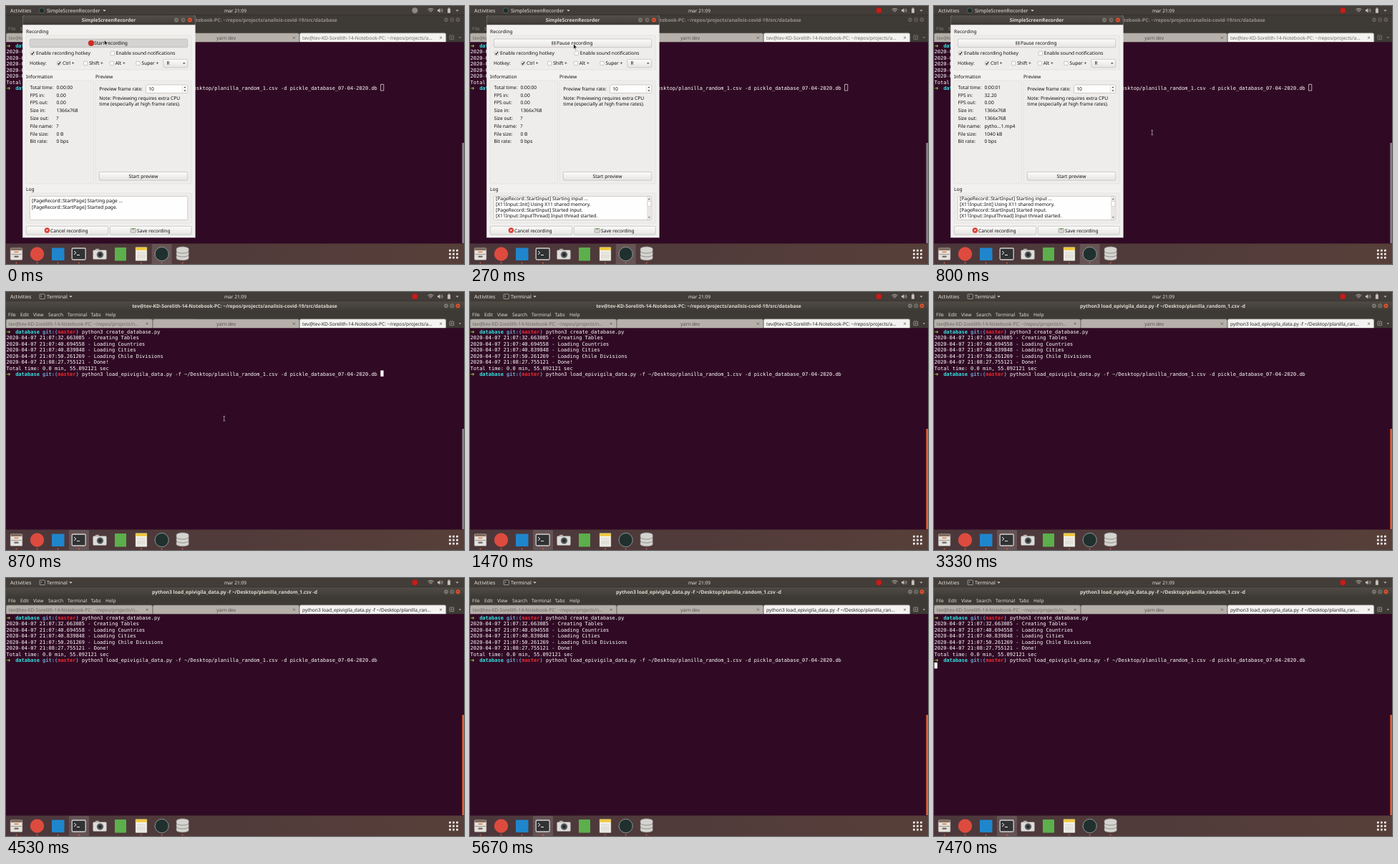
Recreate the animation shown at these times as an HTML page with a canvas. Size 640 by 360 pixels, loop 8000 ms.

```html
<!DOCTYPE html>
<html lang="en">
<head>
<meta charset="utf-8">
<title>Screen recording of a terminal</title>
<style>
html, body { margin: 0; width: 100%; height: 100%; overflow: hidden; background: #300a24; }
canvas { display: block; width: 640px; height: 360px; }
</style>
</head>
<body>
<canvas id="stage"></canvas>
<script>
const LOOP = 8000, STEP = 1000 / 15;
const K = 640 / 1366; // desktop pixels to stage pixels
const UI = '"Noto Sans", "Open Sans", sans-serif';
const MONO = '14.95px "DejaVu Sans Mono", monospace';
const CELL = 9 * K, ROW = 18 * K;
const HOST = 'tev@tev-KD-Sorelith-14-Notebook-PC: ~/repos/projects/';
const COMMAND = 'python3 load_epivigila_data.py -f ~/Desktop/planilla_random_1.csv -d';

const canvas = document.getElementById('stage');
const c = canvas.getContext('2d');
const dpr = window.devicePixelRatio || 1;
canvas.width = 640 * dpr;
canvas.height = 360 * dpr;

function rect(x, y, w, h, fill) {
  c.fillStyle = fill;
  c.fillRect(x, y, w, h);
}

function box(x, y, w, h, r, fill, stroke, line = 0.6) {
  c.beginPath();
  c.roundRect(x, y, w, h, r);
  if (fill) { c.fillStyle = fill; c.fill(); }
  if (stroke) { c.strokeStyle = stroke; c.lineWidth = line; c.stroke(); }
}

function disc(x, y, r, fill, stroke, line = 0.5) {
  c.beginPath();
  c.arc(x, y, r, 0, 7);
  c.fillStyle = fill;
  c.fill();
  if (stroke) { c.strokeStyle = stroke; c.lineWidth = line; c.stroke(); }
}

function path(points, stroke, line = 0.7, fill) {
  c.beginPath();
  for (let i = 0; i < points.length; i += 2) c.lineTo(points[i], points[i + 1]);
  if (fill) { c.closePath(); c.fillStyle = fill; c.fill(); }
  if (stroke) { c.strokeStyle = stroke; c.lineWidth = line; c.stroke(); }
}

function gradient(x0, y0, x1, y1, from, to) {
  const g = c.createLinearGradient(x0, y0, x1, y1);
  g.addColorStop(0, from);
  g.addColorStop(1, to);
  return g;
}

const vertical = (y0, y1, top, bottom) => gradient(0, y0, 0, y1, top, bottom);

// y is the middle of the capitals
function text(s, x, y, fill, font, align = 'left') {
  c.save();
  c.translate(x, y + 2.4);
  c.scale(K, K);
  c.font = font;
  c.textRendering = 'geometricPrecision';
  c.textAlign = align;
  c.fillStyle = fill;
  c.fillText(s, 0, 0);
  c.restore();
}

const label = (s, x, y, fill = '#0e0e0e', align) => text(s, x, y, fill, '14.2px ' + UI, align);
const heading = (s, x, y, fill) => text(s, x, y, fill, 'bold 14.4px ' + UI, 'center');

function triangle(x, y, w, fill, dir = 1) {
  path([x - w, y - dir * w / 2, x + w, y - dir * w / 2, x, y + dir * w / 2], null, 0, fill);
}

function cross(x, y, r, stroke, line) {
  path([x - r, y - r, x + r, y + r], stroke, line);
  path([x + r, y - r, x - r, y + r], stroke, line);
}

function topBar(recorder, recording) {
  rect(0, 0, 640, 12.5, '#433d39');
  const ink = '#e6e3df', dim = '#c4bfb9', font = '500 15px ' + UI;
  text('Activities', 6, 6.3, ink, font);
  if (recorder) disc(50, 6.3, 3.6, '#1d2b2b', '#7d8a86');
  else {
    box(47, 3, 7.4, 6.6, 0.8, '#3a3734', '#d5d1cc');
    path([48.5, 4.7, 50, 6, 48.5, 7.3], ink, 0.6);
  }
  text(recorder ? 'SimpleScreenRecorder' : 'Terminal', 57, 6.3, ink, font);
  triangle(recorder ? 137.5 : 90.5, 6.5, 2.2, ink);
  text('mar 21:09', 320.5, 6.3, ink, '500 14.1px ' + UI, 'center');
  disc(571.3, 6.2, 4.2, recording ? '#c0201b' : '#8d8883', recording ? '#7d1a18' : '#4f4a46');
  // network, sound, battery
  for (const r of [2, 4, 6]) {
    c.beginPath();
    c.arc(593.5, 9.4, r, -2.3, -0.84);
    c.strokeStyle = dim;
    c.lineWidth = 0.9;
    c.stroke();
  }
  path([603, 5, 604.5, 5, 606.5, 3, 606.5, 9.5, 604.5, 7.6, 603, 7.6], null, 0, dim);
  for (const r of [2, 3.8]) {
    c.beginPath();
    c.arc(606.3, 6.3, r, -0.8, 0.8);
    c.strokeStyle = dim;
    c.lineWidth = 0.7;
    c.stroke();
  }
  box(617, 3.4, 4, 6.4, 0.6, dim);
  rect(618.1, 2.4, 1.8, 1.1, dim);
  triangle(630.5, 6.5, 2.2, dim);
}

function windowButtons(xs, y, active) {
  xs.forEach((x, i) => {
    const close = i === 2;
    disc(x, y, 3.4, active && close ? '#e4562f' : active ? '#7f7a72' : '#645f58', '#2f2c28');
    const ink = '#35302b';
    if (close) cross(x, y, 1.2, ink, 0.7);
    else if (i) box(x - 1.2, y - 1.2, 2.4, 2.4, 0, null, ink);
    else path([x - 1.4, y, x + 1.4, y], ink, 0.8);
  });
}

function mix(a, b, k) {
  return 'rgb(' + a.map((v, i) => Math.round(v + (b[i] - v) * k)) + ')';
}

function terminalFrame(focused, running, glow) {
  rect(0, 12.5, 640, 25, focused ? vertical(12.5, 26, '#504b45', '#3e3b36') : '#3e3a36');
  rect(0, 26, 640, 11.5, '#3d3a35');
  rect(0, 12.2, 640, 0.5, '#2c2926');
  const title = running ? COMMAND : HOST + 'analisis-covid-19/src/database';
  heading(title, 319.5, 19.3, focused ? '#dfdbd2' : '#99938a');
  windowButtons([615, 623.3, 631.5], 19.2, focused);
  const names = ['File', 'Edit', 'View', 'Search', 'Terminal', 'Tabs', 'Help'];
  [3, 20, 38, 59, 86, 118.5, 139].forEach((x, i) =>
    label(names[i], x, 31.7, focused ? '#dfdbd2' : '#807b73'));

  rect(0, 37.5, 640, 13, '#3d3a35');
  for (const x of [0, 205]) box(x + 0.3, 38, 204.4, 13, [2, 2, 0, 0], '#b5b0aa', '#8b8680');
  box(410.3, 37.8, 204.5, 13, [2, 2, 0, 0], '#f4f3f1', '#8b8680');
  label(HOST + 'n...', 3.5, 44.2, '#6b6661');
  label('yarn dev', 307.7, 44.2, '#55504b', 'center');
  const tab = running ? COMMAND.split('dom')[0] : HOST + 'a';
  label(tab + '...', 414, 44.2, focused ? '#2c2927' : '#6f6a65');
  for (const x of [197.2, 402.5, 607.6]) cross(x, 44.2, 1.4, '#5d5852', 0.8);
  const ink = focused ? '#a9a49b' : '#827d75';
  box(620, 41, 5.6, 5.6, 0.5, null, ink, 0.8);
  path([621.5, 43.8, 624.2, 43.8], ink);
  path([622.8, 42.4, 622.8, 45.2], ink);
  triangle(634.5, 44.3, 1.9, ink);

  rect(0, 50.3, 640, 282, '#300a24');
  rect(637.4, 191, 2.6, 140, mix([139, 130, 136], [222, 98, 55], glow));
}

function mono(s, col, row, fill = '#ffffff', bold = false) {
  text(s, 0.5 + col * CELL, 55.5 + row * ROW, fill, (bold ? 'bold ' : '') + MONO);
}

function prompt(row, command) {
  text('➜', 0.6, 55.5 + row * ROW, '#8ae234', 'bold 15px "DejaVu Sans", sans-serif');
  mono('database', 3, row, '#34e2e2', true);
  mono('git:(', 12, row, '#729fcf', true);
  mono('master', 17, row, '#ef2929', true);
  mono(')', 23, row, '#729fcf', true);
  mono(command, 25, row);
}

function terminalText() {
  prompt(0, 'python3 create_database.py');
  [
    '2020-04-07 21:07:32.663085 - Creating Tables',
    '2020-04-07 21:07:40.694558 - Loading Countries',
    '2020-04-07 21:07:40.839848 - Loading Cities',
    '2020-04-07 21:07:50.261269 - Loading Chile Divisions',
    '2020-04-07 21:08:27.755121 - Done!',
    'Total time: 0.0 min, 55.092121 sec'
  ].forEach((s, i) => mono(s, 0, i + 1));
  prompt(7, COMMAND + ' pickle_database_07-04-2020.db');
}

function caret(col, row, solid) {
  const x = 0.5 + col * CELL, y = 50.7 + row * ROW;
  if (solid) rect(x, y - 0.3, CELL, ROW, '#ffffff');
  else box(x + 0.2, y - 0.4, CELL, ROW + 0.3, 0, null, '#f2eef0', 0.7);
}

function button(x, y, w, h, pressed) {
  box(x, y, w, h, 1.6, pressed ? '#d5d3d1' : vertical(y, y + h, '#fbfbfa', '#e7e5e3'), '#b4afaa');
}

function check(x, y, on, s) {
  box(x - 2.7, y - 2.7, 5.4, 5.4, 0.8, '#fcfcfc', '#a9a49f');
  if (on) path([x - 1.6, y, x - 0.4, y + 1.5, x + 1.9, y - 1.9], '#1a1a1a', 1.1);
  label(s, x + 5, y);
}

function recorder(started, stats) {
  box(23.2, 13, 241.4, 310.3, [3, 3, 0, 0], '#f2f1f0');
  box(23.2, 13, 241.4, 13.2, [3, 3, 0, 0], vertical(13, 26, '#544f49', '#3e3b36'));
  heading('SimpleScreenRecorder', 143.5, 19.7, '#dfdbd2');
  windowButtons([238.1, 247.6, 257], 19.5, true);

  for (const [x, y, w, h] of [[28, 41, 231, 48], [28, 104, 94.5, 144], [125, 104, 134, 144], [28, 261, 231, 42]])
    box(x, y, w, h, 1, '#efedec', '#d8d5d2', 0.5);
  label('Recording', 28, 35.6);
  label('Information', 28, 99);
  label('Preview', 125, 99);
  label('Log', 28, 255.6);

  button(33.3, 46, 220.5, 11.7, !started);
  if (started) {
    rect(114, 49.3, 2.4, 5, '#8a8a8a');
    rect(117.3, 49.3, 2.4, 5, '#8a8a8a');
    label('Pause recording', 121, 51.9);
  } else {
    disc(119, 51.8, 3.9, '#d9281e', '#a8332b');
    label('Start recording', 123, 51.9);
  }
  check(37, 66, true, 'Enable recording hotkey');
  check(148.8, 66, false, 'Enable sound notifications');
  label('Hotkey:', 33, 80);
  check(74, 80, true, 'Ctrl +');
  check(111.2, 80, false, 'Shift +');
  check(147.8, 80, false, 'Alt +');
  check(184.5, 80, false, 'Super +');
  button(220, 74.3, 33.8, 11.5);
  label('R', 224.5, 80);
  triangle(248.8, 80.2, 1.8, '#333');

  const rows = [
    ['Total time:', '0:00:00', '0:00:01'], ['FPS in:', '0.00', '32.20'],
    ['FPS out:', '0.00', '0.00'], ['Size in:', '1366x768', '1366x768'],
    ['Size out:', '?', '1366x768'], ['File name:', '?', 'pytho…1.mp4'],
    ['File size:', '0 B', '1040 kB'], ['Bit rate:', '0 bps', '0 bps']
  ];
  rows.forEach(([name, before, after], i) => {
    const y = 113.5 + i * 10.77;
    label(name, 33.5, y);
    label(stats ? after : before, 70.5, y);
  });

  label('Preview frame rate:', 130.3, 116);
  box(195.5, 110, 58.3, 11.5, 1.5, '#fdfdfd', '#b4afaa');
  path([246.5, 110.3, 246.5, 121.3], '#cfcbc7', 0.5);
  label('10', 199.3, 115.9);
  triangle(250, 113.3, 1.6, '#333', -1);
  triangle(250, 118.4, 1.6, '#333');
  label('Note: Previewing requires extra CPU', 130.3, 128.3);
  label('time (especially at high frame rates).', 130.3, 136.4);
  button(130.3, 231.5, 123.5, 11.7);
  label('Start preview', 192, 237.4, undefined, 'center');

  box(33.3, 265.5, 220.5, 33, 1, '#fefefe', '#b4afaa');
  c.save();
  c.beginPath();
  c.rect(33.6, 265.9, 220, 32.3);
  c.clip();
  const log = started
    ? ['StartInput] Starting input ...', 'Init] Using X11 shared memory.', 'StartInput] Started input.', 'InputThread] Input thread started.']
    : ['StartPage] Starting page ...', 'StartPage] Started page.'];
  log.forEach((s, i) => {
    const source = started && i % 2 ? '[X11Input::' : '[PageRecord::';
    label(source + s, 36, (started ? 268.4 : 272) + i * 8.1);
  });
  if (started) {
    rect(247, 266, 6.6, 32, '#e9e7e5');
    box(247.6, 272.5, 5.5, 6.8, 1, '#fafafa', '#b9b4af', 0.5);
    triangle(250.3, 269.2, 1.5, '#555', -1);
    triangle(250.3, 295, 1.5, '#555');
  }
  c.restore();

  button(28.2, 307.2, 114.5, 11.8);
  disc(57.4, 313, 3.7, '#d8372b');
  cross(57.4, 313, 1.4, '#fff', 1);
  label('Cancel recording', 62, 313.2);
  button(145.3, 307.2, 114, 11.8);
  box(174.2, 310.5, 7.2, 5.6, 0.8, '#d9d8d5', '#7d7d7a', 0.6);
  triangle(177.8, 311.4, 2.2, '#55a832');
  label('Save recording', 183.1, 313.2);
}

function dock(active) {
  rect(0, 331.5, 640, 28.5, gradient(0, 0, 640, 0, '#4b373b', '#573f39'));
  box(active - 14, 332, 28, 28, 0, 'rgba(255,255,255,0.13)');

  box(6, 337.5, 17, 17, 1.5, '#e4e1dc', '#77716a');
  rect(6.5, 338, 16, 3, '#806b5e');
  rect(7, 346, 15, 0.8, '#89837c');
  box(11.5, 348.5, 6, 2.3, 0.6, '#6c6761');
  rect(11.5, 342.5, 6, 1.5, '#e7773f');

  disc(43.5, 346, 9.7, '#dd4b3e');
  box(64, 337.5, 17.5, 17.5, 1, '#1f86cd');

  box(92.2, 338, 19, 16, 1.5, '#303234', '#d3d1ce', 1.3);
  path([95, 342, 98, 344.4, 95, 346.8], '#eee', 1);
  path([99, 347.5, 103, 347.5], '#eee', 1);

  box(121.5, 340.5, 19, 13, 1.6, '#dedcd9', '#8b8783');
  rect(125, 338.8, 5, 2, '#b7b3ae');
  disc(131.5, 347, 4.9, '#55595c', '#eee');
  disc(131.5, 347, 2.4, '#242a30');

  box(152, 337, 16, 18.5, 0.6, '#5caf4b');

  box(181, 336.5, 16, 19, 0.8, '#f6f5ee', '#8d8980');
  rect(181.3, 336.8, 15.4, 4, '#f1c83c');
  for (let y = 343.5; y < 354; y += 2.3) rect(183, y, 12, 0.6, '#b1afa9');

  disc(217.7, 346, 9.6, '#1f302f', '#8d9693', 1);

  // stacked disks
  for (let y = 352; y > 339; y -= 5) {
    c.beginPath();
    c.ellipse(246.7, y, 8.7, 3, 0, 0, Math.PI);
    c.lineTo(238, y - 3.2);
    c.ellipse(246.7, y - 3.2, 8.7, 3, 0, Math.PI, Math.PI * 2);
    c.closePath();
    c.fillStyle = '#d4d3d0';
    c.fill();
    c.strokeStyle = '#77736f';
    c.lineWidth = 0.7;
    c.stroke();
  }
  for (const x of [14.5, 43.5, 72.5, 102, 189, 217.7, 246.7]) disc(x, 358.3, 0.9, '#e8663c');
  for (let i = 0; i < 9; i++)
    box(619 + i % 3 * 5, 339.7 + Math.floor(i / 3) * 5, 2.8, 2.8, 0.5, '#efeceb');
}

function pointer(i) {
  const k = Math.min(1, Math.max(0, (i - 3) / 8));
  const e = k * k * (3 - 2 * k);
  const x = 137.3 + 167.5 * e, y = 47 + 129.6 * e;
  if (x < 264) {
    path([x, y, x, y + 8, x + 1.8, y + 6.3, x + 3, y + 9, x + 4.2, y + 8.4, x + 3, y + 5.9, x + 5.4, y + 5.7], '#fff', 0.7, '#222');
  } else {
    path([x, y - 3.2, x, y + 3.2], '#d5d0d3', 0.7);
    for (const d of [-3.2, 3.2]) path([x - 1.3, y + d, x + 1.3, y + d], '#d5d0d3', 0.6);
  }
}

function draw(t) {
  const i = Math.floor((t + 4) / STEP);
  const started = i >= 1, focused = i >= 13, running = i >= 23;
  c.setTransform(dpr, 0, 0, dpr, 0, 0);
  topBar(!focused, started);
  terminalFrame(focused, running, Math.min(1, Math.max(0, (i - 13) / 3)));
  terminalText();
  if (i < 22) caret(124, 7, focused);
  else if (running && Math.floor((i - 23) * STEP / 591 + 0.03) % 2 === 0) caret(0, 8, true);
  dock(focused ? 102 : 217.7);
  if (!focused) recorder(started, i >= 11);
  if (i < 21) pointer(i);
}

const start = performance.now();
function tick() {
  draw((performance.now() - start) % LOOP);
  requestAnimationFrame(tick);
}
tick();
</script>
</body>
</html>
```
